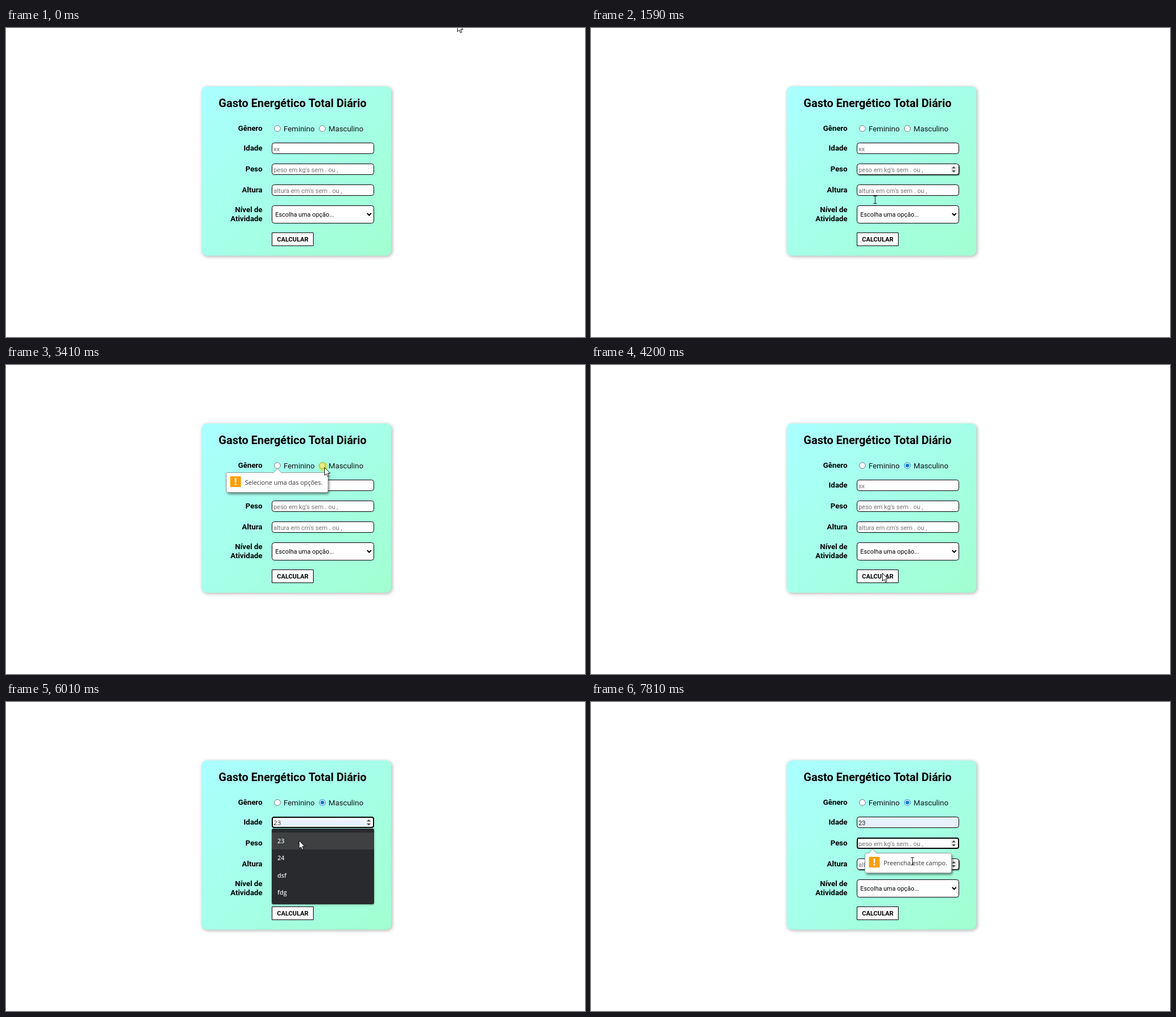
An HTML page with a canvas that plays this animation: 1024 by 547 pixels, repeating every 8000 ms.

```html
<!DOCTYPE html>
<html lang="pt">
<head>
<meta charset="utf-8">
<title>Gasto Energético Total Diário</title>
<style>
  html, body { margin: 0; width: 100%; height: 100%; overflow: hidden; background: #fff; }
  canvas { display: block; }
</style>
</head>
<body>
<canvas id="stage" width="1024" height="547"></canvas>
<script>
const ctx = document.getElementById('stage').getContext('2d');
const LOOP = 8000, STEP = 200;

// Pointer stops: [step, x, y]
const stops = [
  [1, 798, -8], [2, 790, 8], [5, 640, 160], [7, 518, 251], [8, 502, 304],
  [9, 503, 358], [10, 506, 373], [12, 508, 374], [14, 530, 320], [16, 561, 190],
  [17, 563, 181], [19, 563, 181], [21, 515, 368], [23, 514, 374], [24, 532, 300],
  [25, 548, 220], [27, 545, 217], [28, 530, 232], [30, 518, 245], [32, 518, 247],
  [34, 527, 391], [35, 520, 376], [36, 520, 375], [37, 528, 360], [39, 568, 282]
];
const clicks = [10, 17, 22, 26, 31, 35];
const rows = { idade: 203.5, peso: 240.5, altura: 277.5 };

function pointerAt(step) {
  const i = stops.findIndex(s => s[0] >= step);
  if (i <= 0) return stops[0].slice(1);
  const [a, ax, ay] = stops[i - 1], [b, bx, by] = stops[i];
  const k = (step - a) / (b - a);
  return [ax + (bx - ax) * k, ay + (by - ay) * k];
}

function text(str, x, y, font, color = '#000', align = 'left') {
  ctx.font = font;
  ctx.fillStyle = color;
  ctx.textAlign = align;
  ctx.fillText(str, x, y);
}
const roboto = (size, weight = 400) => `${weight} ${size}px Roboto, sans-serif`;
const humanist = (size, weight = 400) => `${weight} ${size}px "Open Sans", sans-serif`;

function shadow(color, blur, dx = 0, dy = 0) {
  ctx.shadowColor = color;
  ctx.shadowBlur = blur;
  ctx.shadowOffsetX = dx;
  ctx.shadowOffsetY = dy;
}
const noShadow = () => shadow('transparent', 0);

function box(x, y, w, h, r, fill, stroke, line = 1) {
  ctx.beginPath();
  ctx.roundRect(x, y, w, h, r);
  ctx.fillStyle = fill;
  ctx.fill();
  noShadow();
  if (!stroke) return;
  ctx.strokeStyle = stroke;
  ctx.lineWidth = line;
  ctx.stroke();
}

function disc(x, y, r, fill, stroke) {
  ctx.beginPath();
  ctx.arc(x, y, r, 0, Math.PI * 2);
  ctx.fillStyle = fill;
  ctx.fill();
  if (!stroke) return;
  ctx.strokeStyle = stroke;
  ctx.lineWidth = 1;
  ctx.stroke();
}

function shape(points, fill) {
  ctx.beginPath();
  points.forEach(([x, y]) => ctx.lineTo(x, y));
  ctx.closePath();
  ctx.fillStyle = fill;
  ctx.fill();
}

function card() {
  const g = ctx.createLinearGradient(356, 93, 672, 413);
  g.addColorStop(0, '#aaffff');
  g.addColorStop(1, '#a1ffd0');
  shadow('rgba(0,0,0,.32)', 6, 1.5, 1.5);
  box(346, 103.5, 335.5, 299.5, 9, g);
  text('Gasto Energético Total Diário', 376, 139.5, roboto(20.05, 700));
  const labels = [['Gênero', 182], ['Idade', 217], ['Peso', 254], ['Altura', 291], ['Nível de', 326], ['Atividade', 342]];
  for (const [name, y] of labels) text(name, 453.5, y, roboto(13.33, 700), '#000', 'right');
}

function radio(x, label, checked) {
  disc(x, 178, 5.3, '#fff', checked ? '#0a76d6' : '#767676');
  if (checked) disc(x, 178, 3.3, '#0a76d6');
  text(label, x + 11, 183, roboto(13.33), '#111');
}

function field(y, hint, { value, hover, focus, preview }) {
  const fill = value && !preview ? '#e8f0fe' : '#fff';
  if (hover) shadow('rgba(0,0,0,.75)', 2, 1.5, 1.5);
  if (focus) box(471, y + .5, 179, 18, 3, fill, '#000', 2);
  else box(470.5, y, 180, 19, 4, fill, '#000');
  if (preview) box(486, y + 5, 148, 10, 0, '#eaf1fd');
  if (preview) text(value, 473, y + 14.3, humanist(11.6), '#222');
  else text(value || hint, 473, y + 14, roboto(11.11), value ? '#222' : '#757575');
  if (!hover && !focus) return;
  const c = y + 9.7;
  box(636, y + 3, 11, 13, 1, '#f0f0f0');
  shape([[638, c - 1.7], [641.5, c - 5.2], [645, c - 1.7]], '#444');
  shape([[638, c + 1.7], [641.5, c + 5.2], [645, c + 1.7]], '#444');
}

function selectAndButton() {
  box(470.5, 314.5, 180, 31, 4, '#fff', '#000');
  text('Escolha uma opção...', 476.3, 334, roboto(10.9), '#000');
  ctx.beginPath();
  ctx.moveTo(638.8, 328);
  ctx.lineTo(642.3, 331.5);
  ctx.lineTo(645.8, 328);
  ctx.strokeStyle = '#000';
  ctx.lineWidth = 2;
  ctx.stroke();
  box(470.5, 362.5, 73, 23, 0, '#fff', '#000');
  text('CALCULAR', 507, 378.3, roboto(11.11, 700), '#000', 'center');
}

function bubble(x, y, w, tip, message) {
  shadow('rgba(0,0,0,.5)', 4, 2, 3);
  ctx.beginPath();
  ctx.roundRect(x + .5, y + .5, w, 35, 3);
  ctx.fillStyle = '#fff';
  ctx.fill();
  noShadow();
  ctx.strokeStyle = '#8d9a98';
  ctx.lineWidth = 1;
  ctx.stroke();
  shape([[tip - 7, y + 1.2], [tip, y - 6], [tip + 7, y + 1.2]], '#fff');
  ctx.beginPath();
  ctx.moveTo(tip - 7, y + .5);
  ctx.lineTo(tip, y - 6.5);
  ctx.lineTo(tip + 7, y + .5);
  ctx.stroke();
  box(x + 7.5, y + 7, 19, 19, 1, '#ff9f0a');
  shape([[x + 15.5, y + 10.5], [x + 18.5, y + 10.5], [x + 18.1, y + 18.5], [x + 15.9, y + 18.5]], '#fff');
  box(x + 15.7, y + 20, 2.6, 2.6, 0, '#fff');
  text(message, x + 33.5, y + 22, humanist(10.95), '#333');
}

function suggestions(active) {
  shadow('rgba(0,0,0,.35)', 3, 0, 1);
  box(470, 224, 181, 134, 3, '#292a2d');
  if (active) box(470, 231, 181, 30, 0, '#3f4042');
  ['23', '24', 'dsf', 'fdg'].forEach((s, i) => text(s, 480, 250.2 + 30.2 * i, humanist(10.8, 600), '#e8eaed'));
}

function arrow(x, y) {
  ctx.save();
  ctx.translate(x + .5, y + .5);
  ctx.beginPath();
  [[0, 0], [0, 14], [3.2, 11], [5.4, 16], [7.6, 15], [5.5, 10.2], [9.8, 10.2]].forEach(p => ctx.lineTo(...p));
  ctx.closePath();
  ctx.fillStyle = '#fff';
  ctx.fill();
  ctx.strokeStyle = '#111';
  ctx.lineWidth = 1;
  ctx.stroke();
  ctx.restore();
}

function beam(x, y) {
  x = Math.round(x) + .5;
  ctx.beginPath();
  for (const end of [-6.5, 6.5]) {
    ctx.moveTo(x - 3, y + end);
    ctx.lineTo(x + 3, y + end);
  }
  ctx.moveTo(x, y - 6.5);
  ctx.lineTo(x, y + 6.5);
  ctx.strokeStyle = '#222';
  ctx.lineWidth = 1;
  ctx.stroke();
}

function draw(now) {
  const step = Math.floor((now % LOOP + 10) / STEP) % (LOOP / STEP);
  const within = (a, b) => step >= a && step <= b;
  const [x, y] = pointerAt(step);

  ctx.fillStyle = '#fff';
  ctx.fillRect(0, 0, 1024, 547);
  card();
  radio(480, 'Feminino', false);
  radio(559.5, 'Masculino', step >= 18);
  field(rows.idade, 'xx', {
    value: step >= 29 ? '23' : '',
    preview: within(29, 31),
    focus: within(23, 35)
  });
  field(rows.peso, "peso em kg's sem . ou ,", { hover: within(7, 8), focus: step >= 36 });
  field(rows.altura, "altura em cm's sem . ou ,", { hover: step === 39 });
  selectAndButton();

  if (within(11, 17)) bubble(389, 190, 180, 480, 'Selecione uma das opções.');
  if (within(23, 25)) bubble(484, 231, 153, 498, 'Preencha este campo.');
  if (within(27, 31)) suggestions(step >= 29);
  if (step >= 36) bubble(484, 267, 153, 498, 'Preencha este campo.');

  if (clicks.includes(step)) disc(x - 2, y - 1, 8.5, 'rgba(215,215,0,.5)');
  if (within(7, 8) || within(25, 27) || step === 39) beam(x, y);
  else arrow(x, y);
  requestAnimationFrame(draw);
}
requestAnimationFrame(draw);
</script>
</body>
</html>
```
